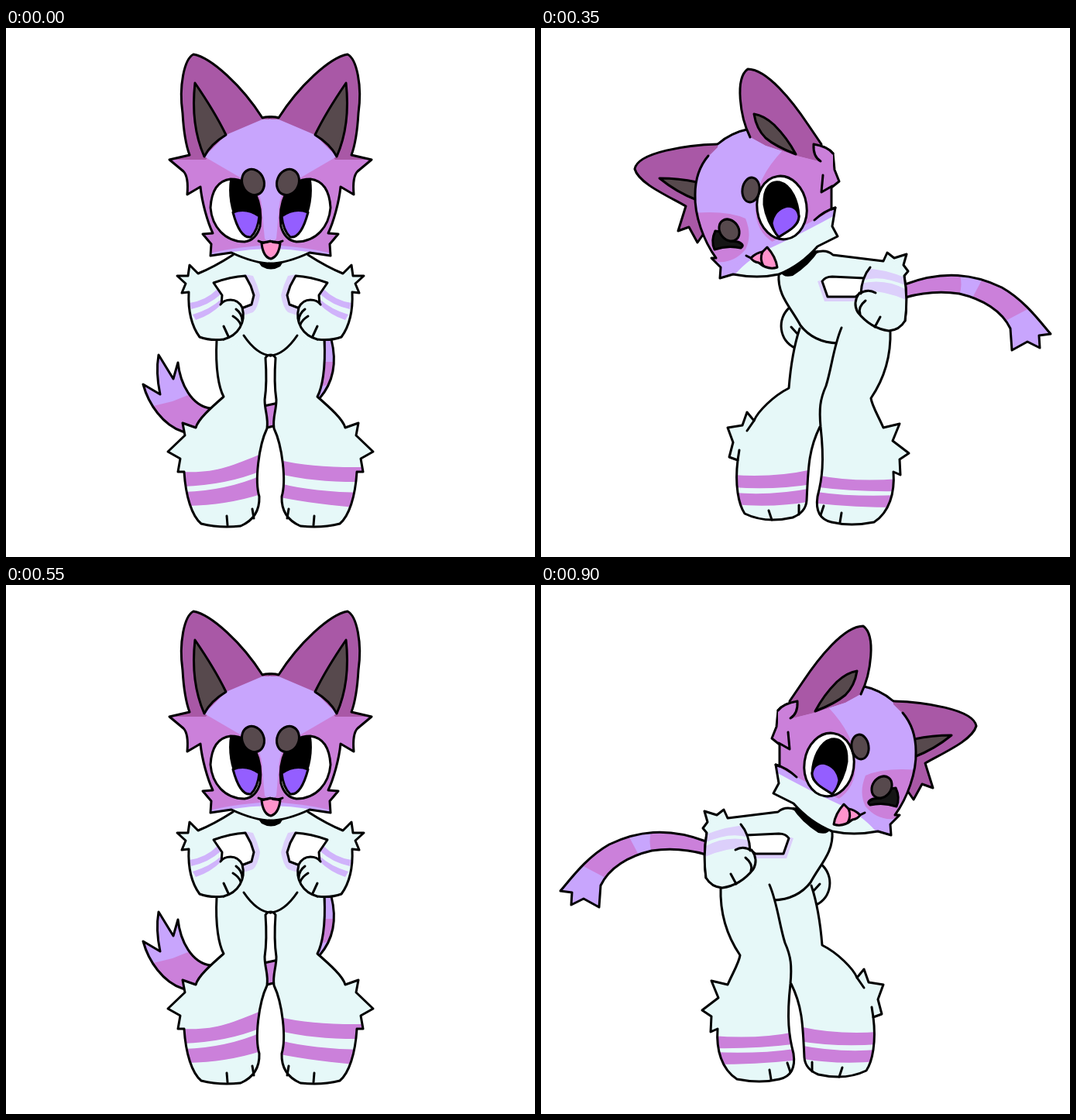
Write an HTML page with a canvas that moves like this. It is 683 px wide and 683 px high and loops after 1100 ms.

```html
<!DOCTYPE html>
<html>
<head>
<meta charset="utf-8">
<style>
html, body { margin: 0; height: 100%; overflow: hidden; background: #fff; }
canvas { display: block; }
</style>
</head>
<body>
<canvas id="stage" width="683" height="683"></canvas>
<script>
const SIZE = 683;
const ctx = document.getElementById('stage').getContext('2d');
const plum = '#a958a6', pink = '#cb80da', lilac = '#c8a5fd', mist = '#dccffb', band = '#d0b3fb',
  mint = '#e6f8f8', gray = '#57494d', iris = '#945eff', tongue = '#ff93cc', black = '#000', white = '#fff';

function fill(d, color) {
  ctx.fillStyle = color;
  ctx.fill(new Path2D(d));
}

function ink(d) {
  ctx.lineWidth = 3;
  ctx.stroke(new Path2D(d));
}

// Fills line + rest, paints [color, path] patches clipped to it, then inks the line.
function part(line, color, patches = [], rest = '') {
  ctx.save();
  ctx.clip(new Path2D(line + rest));
  fill(line + rest, color);
  for (const [c, d] of patches) fill(d, c);
  ctx.restore();
  ink(line);
}

function oval(x, y, rx, ry, degrees, color) {
  ctx.beginPath();
  ctx.ellipse(x, y, rx, ry, degrees * Math.PI / 180, 0, 7);
  ctx.fillStyle = color;
  ctx.fill();
  ctx.lineWidth = 3;
  ctx.stroke();
}

function mirrored(draw, arg) {
  ctx.save();
  ctx.translate(SIZE, 0);
  ctx.scale(-1, 1);
  draw(arg);
  ctx.restore();
}

function frontBody(stripes) {
  const arm = 'M293,293Q268,309 248,317L237,306L235,320L221,320L232,330L227,342L236,341C235,362 239,384 250,399Q263,404 281,402';
  fill(arm + 'L272,404L343,424V290Z', mint);
  part('M272,403C270,440 275,465 281,476C265,490 248,505 245,516L228,510L231,526L209,547L225,556L222,573L230,573'
    + 'C232,605 240,630 252,640Q275,646 303,643Q328,632 327,605C321,585 326,540 337,517C339,502 334,495 334,480C337,460 336,440 335,426Q337,422 342,422',
    mint, stripes.map(d => [pink, d]));
  fill('M308,318L319,320Q325,332 328,345Q325,362 319,367L304,372V350Z', mist);
  fill('M237,355Q258,352 273,337L277,344Q262,358 239,363Z M241,370Q264,363 278,350L279,356Q264,371 245,377Z', band);
  part('M268,329Q290,321 309,320L316,333L320,345L317,357L304,362L278,358L279,345Z', white);
  ink(arm);
  part('M281,402C300,397 310,380 305,361Q300,351 290,351Q281,351 277,357', mint, [], 'L272,390Z');
  ink('M297,363Q305,369 305,378M293,372Q301,377 303,383M281,385L287,398M285,630L286,642M318,621L320,633M307,397Q324,422 342,423');
}

function frontHead() {
  const outline = 'M343,115Q337,114 331,116C305,75 265,38 242,34C230,40 223,75 228,110Q230,145 237,164L211,170L229,185Q236,192 234,215L251,205'
    + 'C253,225 260,250 267,265L254,266L265,279L264,294L291,290C308,298 325,304 343,304';
  part(outline, pink, [
    [plum, 'M200,20H343V117L284,140L258,170H200Z'],
    [lilac, 'M343,118H331L284,138L256,166L304,194Q331,205 331,240L334,272L343,280Z'],
    [lilac, 'M255,293Q290,283 343,280V310H255Z'],
    [mint, 'M264,296Q310,283 343,286V310H264Z']], 'Z');
  part('M244,71Q270,109 284,138Q264,150 256,166Q238,125 244,71Z', gray);
  part('M264,232Q266,198 290,195Q312,195 322,214Q331,233 328,256Q323,274 308,276C282,276 266,256 264,232Z', white, [
    [black, 'M290,190Q322,190 331,225L328,248L293,240Q285,215 290,190Z']]);
  part('M293,238Q310,231 327,243Q325,262 316,270Q302,272 293,238Z', iris);
  oval(319, 199, 14, 17, -22, gray);
}

function front() {
  part('M264,491C240,488 225,460 222,432L216,453L197,422Q193,445 199,473L177,460C184,486 203,513 228,521C265,530 305,524 337,516'
    + 'C365,510 390,497 405,478C423,457 427,430 420,402L411,400C412,440 400,478 347,485C315,493 285,493 264,491Z', pink, [
    [lilac, 'M170,415H235V474L215,482L186,489Z M405,398H430V431H405Z M398,464L415,461L400,485Z']]);
  frontBody(['M228,573C270,575 290,566 329,550V572Q285,590 228,592Z', 'M230,599Q285,597 329,578V602Q285,616 234,617Z']);
  mirrored(frontBody, ['M329,558Q288,568 220,567V586Q283,587 329,576Z', 'M329,588Q288,599 220,600V620Q283,615 329,606Z']);
  fill('M324,300H359L354,308Q342,315 330,308Z', black);
  frontHead();
  mirrored(frontHead);
  part('M330,278Q332,296 342,298Q352,295 354,278Q342,273 330,278Z', tongue);
  ink('M326,275Q333,279 341,275Q349,279 357,275');
}

function lean() {
  part('M484,332C520,345 550,385 552,432C553,470 540,505 528,522L524,512L498,523L499,493L486,491C505,478 519,445 518,412C517,380 505,358 482,350Z', pink, [
    [lilac, 'M475,325L518,354L497,366L475,355Z M510,405Q530,400 556,404V422H510Z M480,475Q515,470 550,480V530H480Z']]);
  part('M326,360C315,378 317,398 335,407L345,390', mint);
  ink('M330,387L337,395');
  part('M343,392C333,415 328,440 327,463C310,475 290,498 283,509L272,496L270,511L248,513L256,538L254,557L267,560C263,590 267,620 275,631'
    + 'Q300,640 330,634Q345,627 346,605C347,575 350,535 366,510', mint, [
    [pink, 'M260,577Q310,581 350,566V584Q310,597 260,591Z M260,597Q310,601 350,586V602Q310,616 260,610Z']], 'L395,400Z');
  ink('M271,546L267,560M283,509L279,514');
  part('M392,402C365,403 345,396 335,380C325,362 315,350 310,328L352,290L373,284Q410,275 450,277L453,265L461,271L476,266L474,279L483,287L474,292Q483,310 484,340', mint,
    [[mist, 'M371,314H379V337H414V342H371Z M318,346L326,348L340,380L334,378Z']], 'L470,378Z');
  part('M377,315L427,305L418,326L413,334L379,337Z', white);
  part('M404,373C385,398 392,415 382,440C375,465 365,470 366,510C370,550 366,580 357,605C355,625 363,635 375,638Q400,643 430,636'
    + 'C445,625 452,598 455,575L462,577V557L473,546L455,530L459,512L444,513L431,475C445,450 460,410 458,380', mint, [
    [pink, 'M350,573Q385,584 460,583V599Q390,597 350,587Z M350,593Q385,602 460,600V615Q390,613 350,607Z']]);
  part('M424,324Q409,339 413,354Q424,374 450,379Q465,381 470,378C480,360 486,340 483,322', mint, [
    [band, 'M425,301Q455,320 488,331V343Q445,330 420,312Z M420,317Q450,330 488,345V356Q445,342 420,327Z']], 'L474,292L434,293Z');
  ink('M434,293Q424,306 420,326M420,327Q427,321 434,323M432,335Q424,342 425,352M451,356L442,370M298,624L299,636M334,616V629M385,627L383,638M361,616L358,626');
  fill('M309,332Q322,333 338,319Q350,306 376,288L352,288L310,322Z', black);

  part('M229,155C195,133 150,115 136,124C128,132 142,170 156,195Q172,225 183,248L166,258L180,262L187,290L200,281', plum, [
    [pink, 'M160,250H205V295H160Z']], 'L240,200Z');
  part('M158,170Q180,183 194,199L189,238C173,220 170,190 158,170Z', gray);
  part('M229,155Q248,143 270,142L365,172L391,167L377,193L386,213L365,212Q368,230 366,247L371,245L366,266L375,280C345,298 330,318 312,328'
    + 'Q280,337 238,331L224,336L222,320L212,311H220C198,280 188,252 190,220Q191,193 206,173', lilac, [
    [plum, 'M190,140H232L237,155L203,189Z'],
    [pink, 'M326,176L400,160V270Q340,284 296,291Q269,274 268,240Q270,213 290,199Z'],
    [pink, 'M188,241Q240,241 264,252Q270,285 250,301L212,306Z'],
    [mist, 'M220,337Q250,304 300,294Q345,284 380,263V340Z'],
    [mint, 'M230,336Q256,307 300,299Q345,290 382,270V340Z']]);
  part('M268,142C272,110 285,55 307,51C325,52 340,85 350,115Q362,150 365,172', plum, [], 'L364,175L331,176L290,152L268,146Z');
  part('M307,90C318,110 331,140 332,172Q308,172 291,151C293,130 298,108 307,90Z', gray);
  ink('M304,87L310,94M371,245Q357,251 346,262');
  oval(303, 246, 33, 42, -8, white);
  oval(301, 243, 21, 32, -10, black);
  part('M289,254Q298,240 319,243Q328,256 325,270Q316,283 304,283Q289,273 289,254Z', iris);
  oval(262, 222, 11, 16, 10, gray);
  part('M214,276Q211,290 217,297Q235,292 249,297Q254,291 244,288Q226,289 222,276Z', '#151515');
  oval(235, 272, 11, 15, -40, gray);
  part('M258,310Q264,304 271,304Q275,297 283,295Q294,308 296,323Q282,325 273,318Q263,316 260,309', tongue);
  ink('M271,304Q269,312 274,318M283,295L287,299');
}

function bow() {
  part('M470,331C520,312 560,318 595,335C625,352 645,380 658,395L643,397L644,413L628,405L608,416L606,388C595,365 570,350 540,343Q505,338 470,348Z', pink, [
    [lilac, 'M540,315L571,322L556,350L540,345Q545,332 540,315Z M598,379L636,359L670,390L640,425H598Z']]);
  part('M322,360C303,375 308,405 328,413L337,390', mint);
  ink('M323,386L333,397');
  part('M334,388C325,415 322,440 320,465C300,475 280,495 275,507L266,496L260,513L241,516L248,535L243,554L254,558C250,590 255,615 263,627'
    + 'Q290,640 325,632Q342,625 343,610C345,570 345,545 360,515', mint, [
    [pink, 'M248,577Q300,581 350,570V589Q300,597 248,593Z M248,600Q300,604 350,594V611Q300,620 248,615Z']], 'L385,400Z');
  ink('M275,507L266,520M256,545L254,558');
  part('M383,407Q352,406 335,384C322,360 305,345 307,318L354,290Q368,285 377,293L442,301L447,290L456,297L472,292L468,306L474,314L469,320Q474,350 470,378', mint,
    [[mist, 'M357,327L364,325L372,347H407V353H366Z']], 'L451,392Z');
  part('M363,327Q367,321 376,321L418,323L413,342L406,347H370Z', white);
  part('M388,387C378,410 375,440 368,462C360,480 359,492 361,515C366,560 363,582 357,605C354,625 362,635 375,638Q400,644 430,638'
    + 'C450,625 457,600 455,573L464,577L463,557L475,549L454,533L463,511L442,516C435,500 427,487 426,478C445,450 452,420 451,390', mint, [
    [pink, 'M350,576Q400,587 462,582V598Q400,599 350,592Z M350,598Q400,606 462,603V619Q400,619 350,613Z']]);
  part('M411,342Q402,355 409,367C420,381 435,389 449,391Q463,390 470,378Q474,350 469,320', mint, [
    [mist, 'M415,310Q445,311 474,324V334Q440,318 415,326Z M412,330Q445,322 474,339V352Q440,337 412,340Z']], 'L465,308L422,311Z');
  ink('M425,309Q414,322 413,343M411,343Q422,336 432,342M419,352Q409,360 412,369M438,373L431,386M294,623L298,635M333,616V628M388,626L386,638M365,617L361,629');
  fill('M310,315Q312,323 325,320Q347,306 359,287L340,288Z', black);

  part('M228,150C190,151 125,160 121,182C126,200 160,215 187,230L177,262L191,257L202,277L211,264', plum, [], 'L235,200Z');
  part('M153,194Q178,194 201,199V222Q175,212 153,194Z', gray);
  part('M228,150Q245,135 270,130L352,150Q370,153 377,162L379,183L385,198L375,206V234L380,232L376,256L383,269L357,282Q335,307 307,318'
    + 'Q280,324 248,318L231,323L232,309L220,297H226C210,275 198,242 199,215Q199,185 216,165', lilac, [
    [plum, 'M205,145H229L228,154L209,173Z'],
    [pink, 'M312,158L395,140V232Q340,260 300,277Q276,262 277,230Q277,195 312,158Z'],
    [pink, 'M195,239Q240,235 264,246Q273,268 264,286Q245,308 218,300Z'],
    [lilac, 'M228,321Q260,298 290,280Q335,258 388,229V330H228Z'],
    [mint, 'M246,324Q262,302 292,286Q340,264 388,237V330Z']]);
  part('M270,141C257,115 250,65 267,53C292,53 325,95 345,125L362,150', plum, [], 'V173L330,165L290,152L270,141Z');
  part('M275,111Q288,113 301,125Q318,142 329,163Q303,153 290,142Q278,130 275,111Z', gray);
  part('M361,172Q351,166 352,150Q370,153 377,162', pink, [], 'V180Z');
  ink('M364,190L362,212L376,204M380,232Q366,236 353,248');
  oval(311, 232, 32, 41, -8, white);
  part('M288,228C287,205 297,197 308,199C324,203 332,225 333,243C333,257 315,264 307,270Q291,250 288,228Z', black);
  part('M298,252Q301,234 318,230Q331,230 333,243C333,257 315,264 307,270Q300,263 298,252Z', iris);
  oval(271, 209, 11, 16, 8, gray);
  part('M225,262Q219,275 224,286Q241,280 258,284Q264,280 254,276L244,275L231,263Z', '#151515');
  oval(243, 261, 12, 15, -35, gray);
  part('M271,297Q278,290 286,289L292,283Q303,295 305,309Q293,313 281,303Q274,302 271,297Z', tongue);
  ink('M265,294L271,297M286,289Q282,298 287,307');
}

function draw(time) {
  const half = time % 550;
  const pose = half < 150 ? front : half < 350 ? lean : bow;
  ctx.fillStyle = white;
  ctx.fillRect(0, 0, SIZE, SIZE);
  ctx.lineJoin = ctx.lineCap = 'round';
  if (pose !== front && time % 1100 >= 550) mirrored(pose);
  else pose();
}

const start = performance.now();
function tick() {
  draw(performance.now() - start);
  requestAnimationFrame(tick);
}
tick();
</script>
</body>
</html>
```
